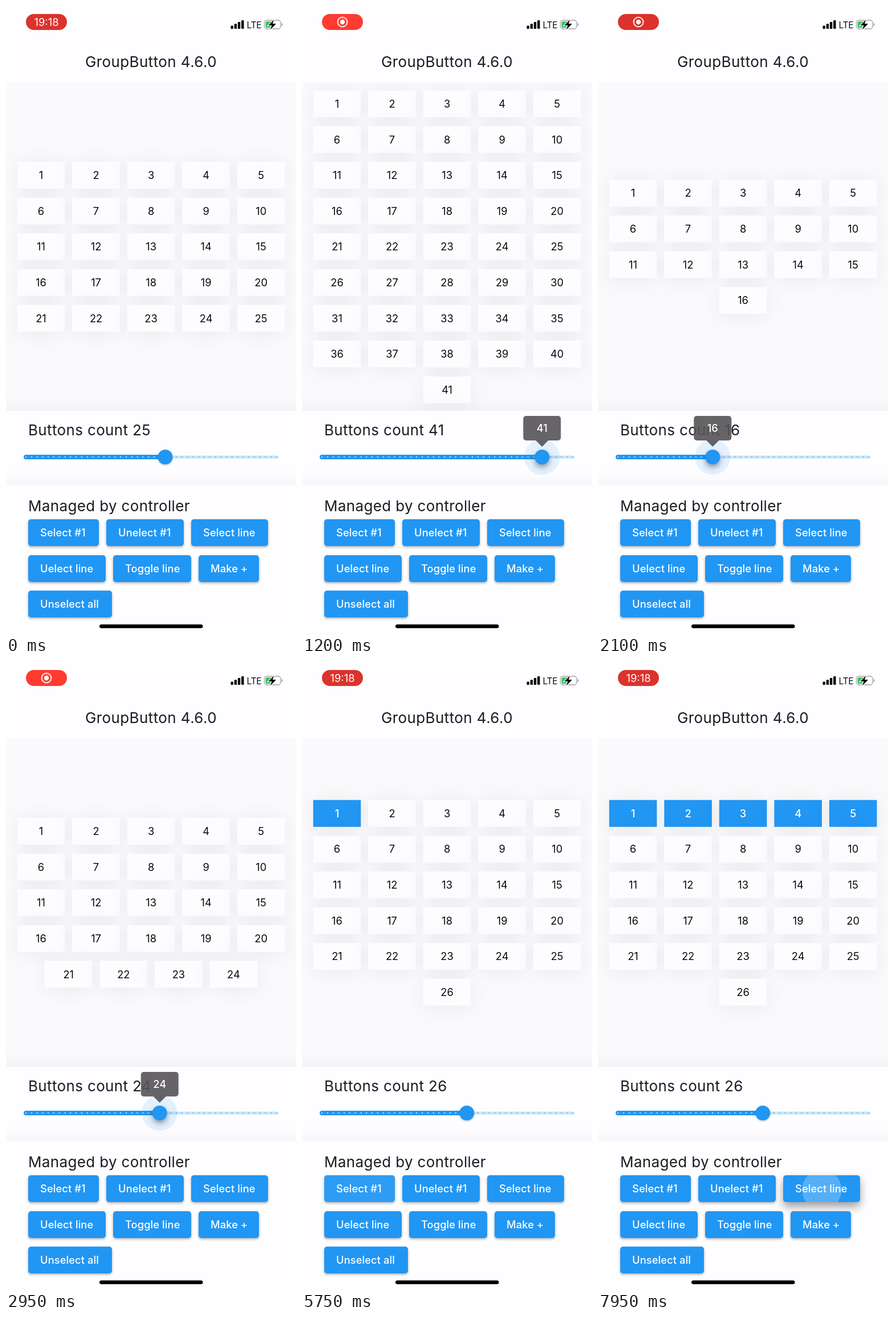
Recreate the animation shown at these times as an HTML page with a canvas. Size 509 by 1100 pixels, loop 8000 ms.

```html
<!DOCTYPE html>
<html lang="en">
<head>
<meta charset="utf-8">
<title>Group buttons demo</title>
<style>
html, body { margin: 0; width: 100%; height: 100%; overflow: hidden; background: #fdfcfe; }
canvas { display: block; width: 509px; height: 1100px; }
</style>
</head>
<body>
<canvas id="stage" width="509" height="1100"></canvas>
<script>
const W = 509, H = 1100, LOOP = 8000;
const BLUE = '#2196f3', FONT = 'Inter, Roboto, sans-serif';
const stage = document.getElementById('stage').getContext('2d');
const gridCanvas = document.createElement('canvas');
gridCanvas.width = W;
gridCanvas.height = H;
const grid = gridCanvas.getContext('2d');

// Finger position on the slider: [time, value]
const DRAG = [[250, 25], [500, 28], [650, 30], [1200, 41], [1520, 41], [1650, 33],
  [1850, 22], [2050, 16], [2300, 16], [2750, 24], [3100, 24], [3300, 26]];
const TOUCH = [130, 3650];

const BUTTONS = [
  ['Select #1', 39, 899, 124], ['Unelect #1', 176, 899, 136], ['Select line', 325, 899, 135],
  ['Uelect line', 39, 962, 136], ['Toggle line', 188, 962, 137], ['Make +', 338, 962, 106],
  ['Unselect all', 39, 1024, 147]
];
// Taps: button index, press time, release time, touch x
const TAPS = [[0, 5350, 5470, 100], [1, 6150, 6270, 244], [2, 7000, 7120, 393], [2, 7700, 8100, 393]];

const clamp = (x, a = 0, b = 1) => Math.min(b, Math.max(a, x));
const ramp = (t, a, b) => clamp((t - a) / (b - a));
const ease = p => p * p * (3 - 2 * p);
const mix = (a, b, p) => a + (b - a) * p;

function countAt(t) {
  let i = DRAG.findIndex(k => k[0] > t);
  if (i === 0) return DRAG[0][1];
  if (i < 0) return DRAG[DRAG.length - 1][1];
  const [t0, a] = DRAG[i - 1], [t1, b] = DRAG[i];
  return Math.round(mix(a, b, (t - t0) / (t1 - t0)));
}

// The thumb trails the value by a short moving average
function thumbAt(t) {
  let sum = 0;
  for (let k = 0; k <= 15; k++) sum += countAt(t - k * 10);
  return 35 + 9.78 * sum / 16;
}

function text(c, str, x, y, size, { weight = 400, color = '#1c1b1d', align = 'left', gap = 0 } = {}) {
  c.font = `${weight} ${size}px ${FONT}`;
  c.letterSpacing = gap + 'px';
  c.textAlign = align;
  c.fillStyle = color;
  c.fillText(str, x, y);
}

function box(c, x, y, w, h, r, color) {
  c.fillStyle = color;
  c.beginPath();
  c.roundRect(x, y, w, h, r);
  c.fill();
}

function disc(c, x, y, r, color) {
  c.fillStyle = color;
  c.beginPath();
  c.arc(x, y, r, 0, Math.PI * 2);
  c.fill();
}

function shadowed(c, alpha, blur, dy, draw) {
  c.save();
  c.shadowColor = `rgba(18,18,18,${alpha})`;
  c.shadowBlur = blur;
  c.shadowOffsetY = dy;
  draw();
  c.restore();
}

let gridKey = '';
function drawGrid(count, selected) {
  const key = count + ':' + selected;
  if (key === gridKey) return;
  gridKey = key;
  grid.clearRect(0, 0, W, H);
  const rows = Math.ceil(count / 5);
  const top = 421.8 - (rows * 62.6 - 15.6) / 2;
  for (let i = 0; i < count; i++) {
    const row = Math.floor(i / 5);
    const inRow = Math.min(5, count - row * 5);
    const x = 254.6 - (inRow * 96.55 - 12.9) / 2 + (i % 5) * 96.55;
    const y = top + row * 62.6;
    const on = i < selected;
    shadowed(grid, 0.07, 39, 2.6, () => box(grid, x, y, 83.6, 47, 0, on ? BLUE : '#fdfcfe'));
    text(grid, String(i + 1), x + 41.8, y + 30, 18.3,
      { align: 'center', color: on ? '#fff' : '#0a0a0b', weight: on ? 500 : 400 });
  }
}

function drawStatus(c, t) {
  const phase = (t % 2000) / 2000;
  const glow = ease(clamp(0.5 - 0.9 * Math.cos(phase * 2 * Math.PI)));
  box(c, 35, 14, 72, 28, 14, `rgb(${mix(220, 255, glow)},${mix(50, 59, glow)},${mix(43, 48, glow)})`);
  const icon = ramp(t, 250, 450) * (1 - ramp(t, 3900, 4100));
  c.save();
  c.globalAlpha = 1 - icon;
  text(c, '19:18', 71, 34.5, 18.4, { align: 'center', color: '#fff' });
  c.globalAlpha = icon;
  disc(c, 71, 28, 4.2, '#fff');
  c.strokeStyle = '#fff';
  c.lineWidth = 1.8;
  c.beginPath();
  c.arc(71, 28, 8.4, 0, Math.PI * 2);
  c.stroke();
  c.restore();

  for (let i = 0; i < 4; i++) {
    const h = 5.5 + i * 3.2;
    box(c, 394.5 + i * 6.2, 40 - h, 4.4, h, 1.2, '#000');
  }
  text(c, 'LTE', 422.5, 38.5, 15.6, { color: '#111', gap: -0.3 });

  c.strokeStyle = '#a3a2a5';
  c.lineWidth = 1.3;
  c.beginPath();
  c.roundRect(453.5, 25, 28.5, 15, 4.5);
  c.stroke();
  box(c, 455.6, 27, 12, 11, 2.5, '#34c759');
  box(c, 483.4, 30, 1.8, 5, 1, '#a3a2a5');
  c.beginPath();
  [[470, 24], [460.5, 34], [466.5, 34], [464, 41.5], [474, 31], [468, 31]].forEach(p => c.lineTo(...p));
  c.closePath();
  c.strokeStyle = '#fdfcfe';
  c.lineWidth = 2.4;
  c.stroke();
  c.fillStyle = '#000';
  c.fill();
}

function drawSlider(c, t, count) {
  const x = thumbAt(t), y = 790;
  const held = ease(ramp(t, TOUCH[0], TOUCH[0] + 100)) * (1 - ease(ramp(t, TOUCH[1], TOUCH[1] + 100)));
  box(c, x, y - 2.6, 478 - x, 5.2, [0, 2.6, 2.6, 0], '#c8e5fc');
  box(c, 31, y - 3.9, x - 31, 7.8, [3.9, 0, 0, 3.9], BLUE);
  for (let i = 0; i <= 45; i++) {
    const tx = 35 + i * 9.78;
    disc(c, tx, y, 1.3, tx < x ? '#a6d5fa' : '#79bdf6');
  }
  if (held) disc(c, x, y, 31 * held, 'rgba(33,150,243,.12)');
  shadowed(c, mix(0.25, 0.4, held), mix(3, 10, held), mix(1.3, 5, held), () => disc(c, x, y, 13, BLUE));
  if (!held) return;

  c.save();
  c.translate(x, y - 18);
  c.scale(held, held);
  c.fillStyle = 'rgba(86,84,86,.9)';
  c.beginPath();
  c.roundRect(-33, -54, 66, 43, 5);
  c.moveTo(-11, -11);
  c.lineTo(0, 0);
  c.lineTo(11, -11);
  c.fill();
  text(c, String(count), 0, -26, 18.3, { align: 'center', color: '#fff', weight: 500 });
  c.restore();
}

function drawButton(c, t, index) {
  const [label, x, y, w] = BUTTONS[index], h = 47;
  const taps = TAPS.filter(p => p[0] === index && t >= p[1] && t < p[2] + 400);
  let lift = 0;
  for (const [, down, up] of taps) {
    lift = Math.max(lift, ease(ramp(t, down, down + 150)) * (1 - ease(ramp(t, up, up + 200))));
  }
  shadowed(c, mix(0.32, 0.4, lift), mix(4, 15, lift), mix(2, 8, lift), () => box(c, x, y, w, h, 5, BLUE));
  for (const [, down, up, touchX] of taps) {
    const start = ramp(Math.min(t, up), down, down + 1000);
    const grow = mix(start, 1, ease(ramp(t, up, up + 225)));
    const fade = ramp(t, down, down + 75) * (1 - ramp(t, up, up + 375));
    c.save();
    c.beginPath();
    c.roundRect(x, y, w, h, 5);
    c.clip();
    disc(c, mix(touchX, x + w / 2, grow), mix(925, y + h / 2, grow), mix(21, 76, grow),
      `rgba(255,255,255,${0.24 * fade})`);
    c.restore();
  }
  text(c, label, x + 21, y + 30, 18.3, { weight: 500, color: '#fff', gap: 0.1 });
}

function draw(t) {
  const c = stage;
  const count = countAt(t);
  const selected = t >= 7120 ? 5 : t >= 5470 && t < 6270 ? 1 : 0;

  c.fillStyle = '#faf9fb';
  c.fillRect(0, 0, W, H);
  drawGrid(count, selected);
  c.drawImage(gridCanvas, 0, 0);
  box(c, 0, 0, W, 134.5, 0, '#fefdff');
  shadowed(c, 0.07, 39, 2.6, () => box(c, -40, 709, W + 80, 140, 0, '#fefdff'));
  shadowed(c, 0.07, 39, 2.6, () => box(c, -40, 839, W + 80, 300, 0, '#fefdff'));

  drawStatus(c, t);
  text(c, 'GroupButton 4.6.0', 254.5, 106.5, 26, { align: 'center', gap: 0.4 });
  text(c, 'Buttons count ' + count, 39, 752, 26, { gap: 0.35 });
  text(c, 'Managed by controller', 39, 885, 26, { gap: 0.35 });
  BUTTONS.forEach((b, i) => drawButton(c, t, i));
  drawSlider(c, t, count);
  box(c, 164, 1083.3, 181.5, 6.4, 3.2, '#000');
}

function frame(now) {
  draw(now % LOOP);
  requestAnimationFrame(frame);
}
draw(0);
requestAnimationFrame(frame);
</script>
</body>
</html>
```
